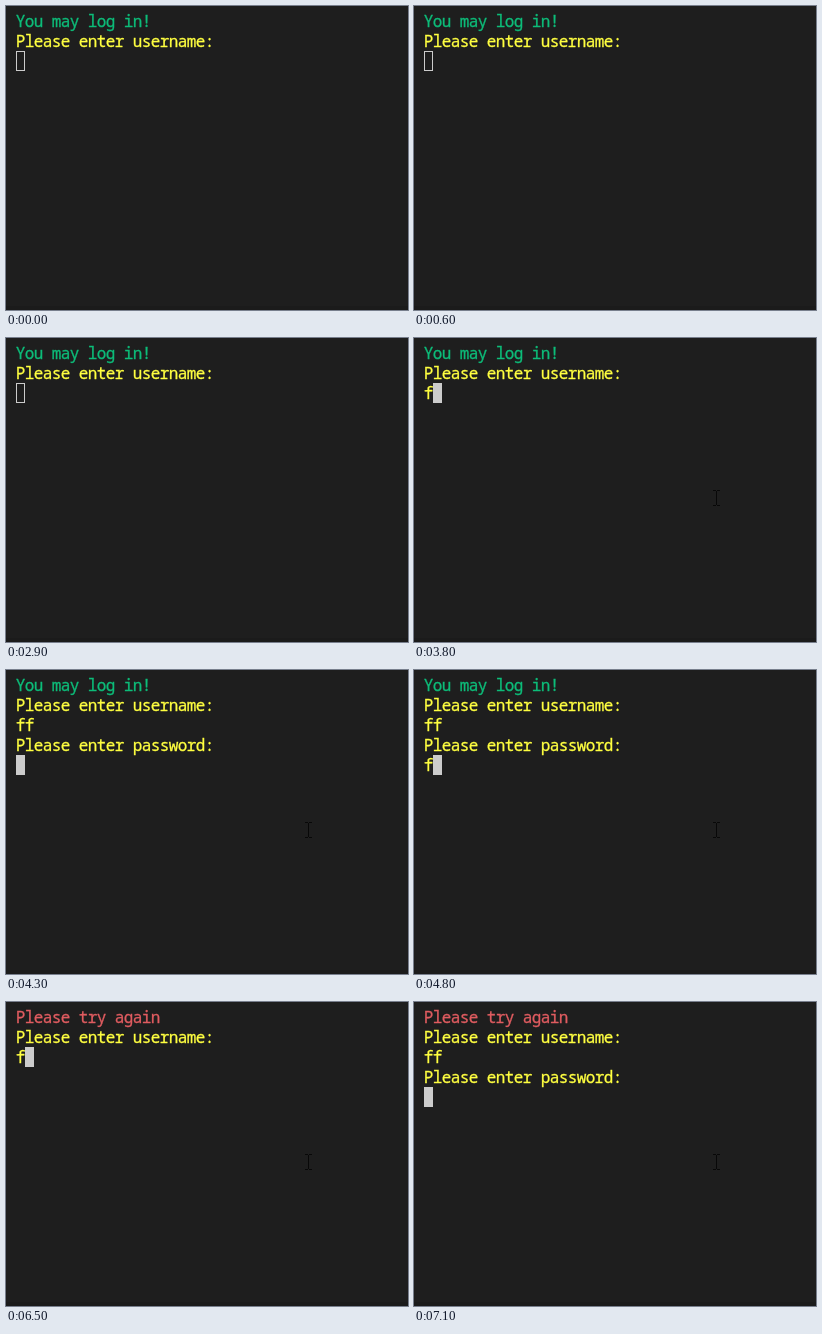
These frames come from a looping animation (402 by 304 pixels, 7200 ms). An HTML page:

```html
<!DOCTYPE html>
<html lang="en">
<head>
<meta charset="utf-8">
<title>Terminal login</title>
<style>
  html, body { margin: 0; width: 100%; height: 100%; overflow: hidden; background: #1e1e1e; }
  svg { display: block; }
  text {
    font: 16px "Noto Sans Mono", monospace; letter-spacing: -0.6px; white-space: pre;
    color: #ffff40; fill: currentColor; stroke: currentColor; stroke-width: 0.3px;
  }
</style>
</head>
<body>
<svg width="402" height="304" viewBox="0 0 402 304">
  <rect y="300" width="402" height="4" fill="#1b1b1b"/>
  <g id="lines"></g>
  <rect id="caret" stroke="#ccc"/>
  <path id="pointer" d="M299 152.5h3m1 0h3M302.5 153v14M299 167.5h3m1 0h3" fill="none" stroke="#080808"/>
</svg>
<script>
const LOOP = 7200, CHAR = 9, LEFT = 9.7, LINE = 19.9;
const POINTER_AT = 3000, FOCUS_AT = 3100;
const GREEN = '#0dbc79', RED = '#e05c60';
const USER = 'Please enter username:', PASS = 'Please enter password:';
const welcome = ['You may log in!', USER], retry = ['Please try again', USER];

// Each step: start time and the terminal lines; the caret follows the last one.
const steps = [
  [0, [...welcome, '']],
  [3500, [...welcome, 'f']],
  [3900, [...welcome, 'ff']],
  [4300, [...welcome, 'ff', PASS, '']],
  [4800, [...welcome, 'ff', PASS, 'f']],
  [5000, [...welcome, 'ff', PASS, 'ff']],
  [5200, [...retry, '']],
  [5900, [...retry, 'f']],
  [6600, [...retry, 'ff']],
  [7000, [...retry, 'ff', PASS, '']]
];

const caret = document.getElementById('caret');
const pointer = document.getElementById('pointer');
const rows = Array.from({ length: 5 }, (_, i) => {
  const row = document.createElementNS('http://www.w3.org/2000/svg', 'text');
  row.setAttribute('x', LEFT);
  row.setAttribute('y', Math.round(21 + i * LINE));
  return document.getElementById('lines').appendChild(row);
});

function setAttributes(element, values) {
  for (const name in values) element.setAttribute(name, values[name]);
}

function draw(time) {
  const lines = steps.findLast(([start]) => start <= time)[1];
  rows.forEach((row, i) => {
    const text = lines[i] || '';
    if (row.textContent !== text) row.textContent = text;
  });
  rows[0].style.color = lines[0] === welcome[0] ? GREEN : RED;

  const last = lines.length - 1;
  setAttributes(caret, {
    x: Math.round(LEFT + lines[last].length * CHAR) + 0.5,
    y: Math.round(5 + last * LINE) + 0.5,
    width: CHAR - 1,
    height: 19,
    fill: time < FOCUS_AT ? 'none' : '#ccc'
  });
  pointer.style.display = time < POINTER_AT ? 'none' : '';
}

const begin = performance.now();
function tick() {
  draw((performance.now() - begin) % LOOP);
  requestAnimationFrame(tick);
}
tick();
</script>
</body>
</html>
```
